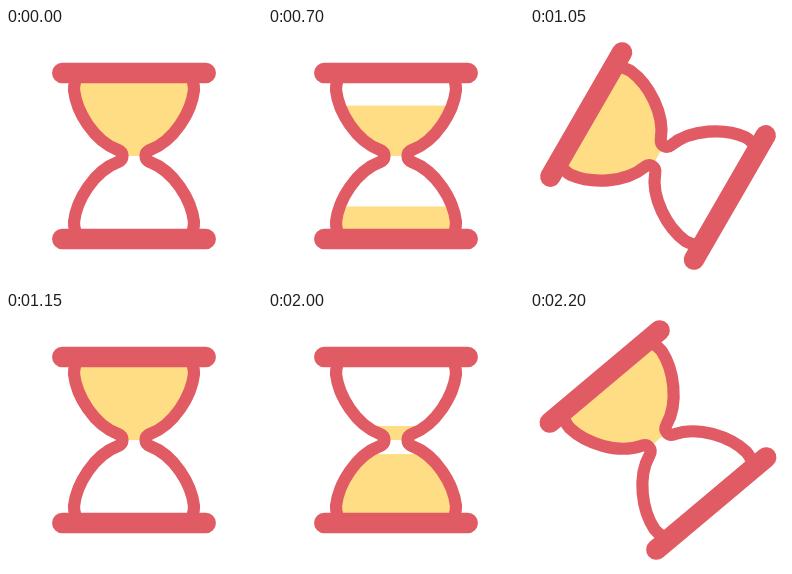
Write an HTML page that moves like this. It is 256 px wide and 256 px high and loops after 2.25 s.

```html
<!DOCTYPE html>
<html lang="en">
<head>
<meta charset="utf-8">
<title>Hourglass</title>
<style>
  html, body { margin: 0; width: 100%; height: 100%; overflow: hidden; background: #fff; }
  svg { display: block; width: 100vw; height: 100vh; }
</style>
</head>
<body>
<svg viewBox="0 0 256 256">
  <defs>
    <path id="side" d="M72 47C69 52 68 57 68 62C70.5 84 88 113 112 122C118 124.5 118 131.5 112 134C88 143 70.5 172 68 194C68 199 69 204 72 209"/>
    <clipPath id="inside">
      <path d="M72 47C69 52 68 57 68 62C70.5 84 88 113 112 122C118 124.5 118 131.5 112 134C88 143 70.5 172 68 194C68 199 69 204 72 209H184C187 204 188 199 188 194C185.5 172 168 143 144 134C138 131.5 138 124.5 144 122C168 113 185.5 84 188 62C188 57 187 52 184 47Z"/>
    </clipPath>
  </defs>
  <g id="hourglass">
    <g clip-path="url(#inside)" fill="#fedd85">
      <rect id="upper" x="60" width="136"/>
      <rect id="lower" x="60" width="136"/>
    </g>
    <g fill="none" stroke="#e15b64" stroke-width="12.2" stroke-linejoin="round">
      <use href="#side"/>
      <use href="#side" transform="matrix(-1 0 0 1 256 0)"/>
      <path d="M56.3 45.1H199.7M56.3 210.9H199.7" stroke-width="20.5" stroke-linecap="round"/>
    </g>
  </g>
</svg>
<script>
  const LOOP = 2250, TURN = LOOP / 2, STEP = 50;
  const POUR_START = 535, FLIP_START = 900;
  const CENTER = 128, DEPTH = 73;
  const byId = id => document.getElementById(id);
  const hourglass = byId("hourglass"), upper = byId("upper"), lower = byId("lower");
  const progress = (t, from, to) => Math.min(1, Math.max(0, (t - from) / (to - from)));

  function span(rect, top, bottom) {
    rect.setAttribute("y", top);
    rect.setAttribute("height", Math.max(0, bottom - top));
  }

  function draw(now) {
    const t = Math.floor((now % LOOP) / STEP) * STEP % TURN;
    // Sand volume drains evenly, so the level drops faster near the neck.
    const level = DEPTH * (1 - progress(t, POUR_START, FLIP_START)) ** 0.615;
    span(upper, CENTER - level, CENTER);
    span(lower, CENTER + level, CENTER + DEPTH);
    const angle = 180 * progress(t, FLIP_START, TURN);
    hourglass.setAttribute("transform", `rotate(${angle} ${CENTER} ${CENTER})`);
  }

  const start = performance.now();
  function tick() {
    draw(performance.now() - start);
    requestAnimationFrame(tick);
  }
  tick();
</script>
</body>
</html>
```
